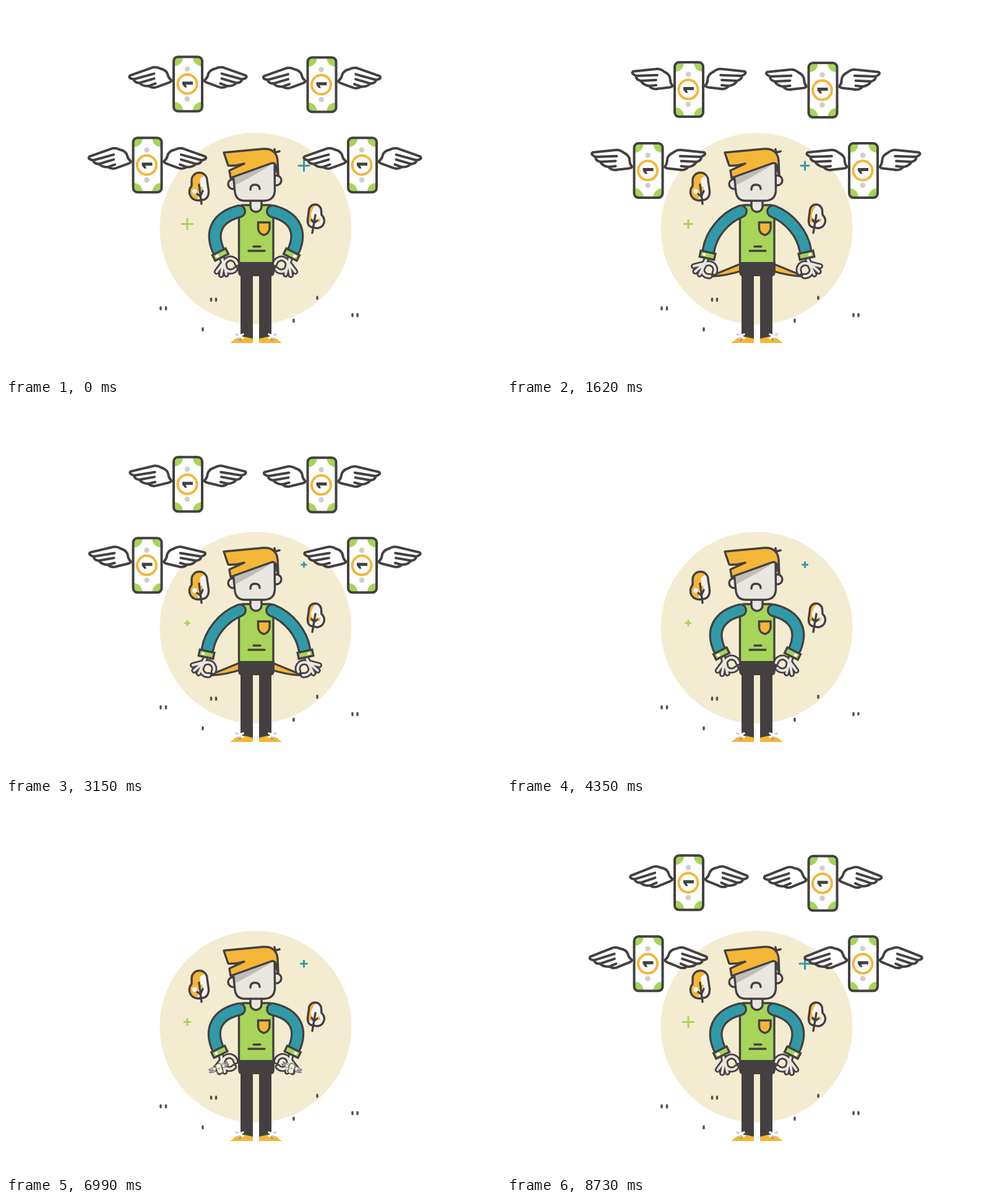
Animation of 800x600 px, one loop 8760 ms. Source, as an HTML page:

```html
<!DOCTYPE html>
<html lang="en">
<head>
<meta charset="utf-8">
<title>Empty pockets</title>
<style>
html, body { margin: 0; width: 100%; height: 100%; overflow: hidden; background: #fff; }
svg { display: block; width: 800px; height: 600px; }
.l { stroke: #444041; stroke-width: 3.4; stroke-linecap: round; stroke-linejoin: round; }
.bold { stroke-width: 4; }
.n { fill: none; }
.dark { fill: #444041; } .green { fill: #a6d55a; } .gold { fill: #f4b637; }
.skin { fill: #e9e6df; } .white { fill: #fff; } .grey { fill: #cdced4; }
.cap { fill: none; stroke-linecap: round; stroke-linejoin: round; }
</style>
</head>
<body>
<svg viewBox="0 0 800 600">
  <defs>
    <clipPath id="iris"><circle id="hole" cx="403" cy="362" r="999"/></clipPath>
    <clipPath id="note"><rect x="-23" y="-44" width="46" height="88" rx="7"/></clipPath>
    <clipPath id="leafA"><path id="treeA" d="M300 291V282A12.500 12.500 0 0 1 325 282L327.500 299Q328 314 314 314A14 14 0 0 1 300 291Z"/></clipPath>
    <clipPath id="leafB"><path id="treeB" d="M510 338L509.500 331A10 10 0 0 0 489.500 331L487.500 346Q487 358 497 358A12 12 0 0 0 510 338Z"/></clipPath>
    <g id="wing">
      <path class="l bold white" d="M-67-8L-33-20Q-26-23-18-19Q-8-17-6-9Q-5-4 0 0Q0 2-5 4L-22 10Q-30 14-37 9Q-46 10-52 4Q-60 4-61-2Q-71-4-67-8Z"/>
      <path class="l bold n" d="M-61-2L-28-11M-52 4L-28-3M-37 9L-26 5"/>
    </g>
    <g id="bill">
      <g id="flap"><use href="#wing"/></g>
      <g transform="scale(-1 1)"><use href="#flap"/></g>
      <rect class="white" x="-23" y="-44" width="46" height="88" rx="7"/>
      <g class="green" clip-path="url(#note)">
        <circle cx="-22" cy="-43" r="14"/><circle cx="22" cy="-43" r="14"/>
        <circle cx="-22" cy="43" r="14"/><circle cx="22" cy="43" r="14"/>
      </g>
      <rect class="l bold n" x="-23" y="-44" width="46" height="88" rx="7"/>
      <circle class="grey" cx="-1" cy="-24.500" r="4.300"/><circle class="grey" cx="-1" cy="24" r="4.300"/>
      <circle cx="-1" r="15.500" fill="#fff" stroke="#f4b637" stroke-width="4"/>
      <path class="dark" d="M8-4v5H-3.500l2 4.500h-3.500L-9 .5V-4z"/>
    </g>
    <g id="shoe">
      <path class="gold" d="M362 545Q368 541 374 535L386 535L399 538V545Z"/>
      <path class="cap" stroke="#8b8786" stroke-width="3" d="M373 535L378 540"/>
      <path class="cap" stroke="#cdced4" stroke-width="3.500" d="M372 531L377 533L376 538"/>
      <path class="cap" stroke="#fff" stroke-width="3.500" d="M372 536L383 531M377 533L383 537"/>
    </g>
    <path id="fingers" d="M0 5L-2 14M-2 14L-18 22M-2 14L-14 30M-1 14L-6 33M17 25.500A10.500 10.500 0 1 0 11 32.200"/>
    <g id="arm">
      <g id="hand">
        <use href="#fingers" class="cap" stroke="#444041" stroke-width="9.500"/>
        <use href="#fingers" class="cap" stroke="#e9e6df" stroke-width="4"/>
      </g>
      <path id="edge" class="cap" stroke="#444041" stroke-width="22"/>
      <path id="sleeve" class="cap" stroke="#319aa8" stroke-width="15.500"/>
      <g id="cuff">
        <rect class="l green" x="-12" y="-5" width="24" height="10" style="stroke-linejoin:miter"/>
        <circle class="white" cx="-5.500" r="2.500"/>
      </g>
    </g>
    <path id="lining" class="l gold"/>
  </defs>

  <g clip-path="url(#iris)">
    <circle cx="403.500" cy="360" r="155" fill="#f4ecd0"/>
    <path id="ground" class="cap" stroke="#575352" stroke-width="3.600"/>
    <path id="plusA" class="cap" stroke="#a6d55a" stroke-width="3"/>
    <path id="plusB" class="cap" stroke="#319aa8" stroke-width="3"/>

    <g clip-path="url(#leafA)">
      <rect class="gold" x="290" y="264" width="42" height="56"/>
      <path fill="#f5f2ec" d="M313 281Q318 272 330 276V320H309L311 299Q316 291 313 281Z"/>
      <circle cx="305" cy="300" r="4" fill="#f5f2ec"/><circle class="gold" cx="315" cy="295" r="3"/>
    </g>
    <use href="#treeA" class="l n"/>
    <path class="l n" d="M312 289L316 320M309 304L314 308L318 299"/>
    <g clip-path="url(#leafB)">
      <rect class="gold" x="480" y="316" width="38" height="48"/>
      <path fill="#f5f2ec" d="M495 331Q497 323 504 322H518V364H499L496 345Q490 340 495 331Z"/>
      <circle cx="493" cy="353" r="3.500" fill="#f5f2ec"/><circle class="gold" cx="505" cy="346.500" r="3"/>
    </g>
    <use href="#treeB" class="l n"/>
    <path class="l n" d="M500 338L495 367M494 346L498 351L503 347"/>

    <use href="#lining"/><use href="#lining" class="flip"/>
    <path class="l green" d="M376.500 416V328Q377 322 383 322H426Q432 322 432 328V416Z"/>
    <path class="dark" d="M375 414H434V428Q434 437 429 437V538H409V437H399V538H379V437Q375 436 375 428Z"/>
    <use href="#shoe"/><use href="#shoe" class="flip"/>
    <path class="l gold" style="stroke-linejoin:miter" d="M407.500 350H426V360Q425 368 417 370.500Q408 368 407.500 360Z"/>
    <path class="l n" d="M400 389H411M392 396H418"/>

    <path class="l skin" d="M395 312V324A9 9 0 0 0 413 324V312Z"/>
    <circle class="l skin" cx="367" cy="288" r="8"/><circle class="l skin" cx="437" cy="282" r="8"/>
    <path class="skin" d="M367 272L370 301Q372 315 386 315H418Q434 314 434.500 298L434 250Z"/>
    <path fill="#bfbdba" d="M368 274L432 252L425 259Q396 277 370 290Z"/>
    <path class="l n" d="M367 272L370 301Q372 315 386 315H418Q434 314 434.500 298L434 250"/>
    <path class="l gold" d="M352 237L416 231Q437 230 439 250L440 273Q437 268 436 258Q434 252 427 255L363 278L361 266L385 255Q370 259 359 258Z"/>
    <path class="l n" d="M434 231.500L435 238M435 237L442 235M395 297Q395 289 402 289Q410 289 410 296"/>
    <use href="#arm"/><use href="#arm" class="flip"/>
  </g>
  <g id="bills"></g>
</svg>
<script>
const LOOP = 8760, $ = id => document.getElementById(id);
const set = (el, name, value) => el.setAttribute(name, value);
const clamp = x => Math.min(1, Math.max(0, x));
const span = (t, a, b) => clamp((t - a) / (b - a));
const smooth = (t, a, b) => { const u = span(t, a, b); return u * u * (3 - 2 * u); };
const mix = (a, b, k) => a + (b - a) * k;

document.querySelectorAll('.flip').forEach(e => set(e, 'transform', 'translate(808) scale(-1 1)'));
set($('ground'), 'd', [[250, 489], [258.5, 489], [331.5, 475], [339.5, 475], [318, 523],
  [465, 509], [503, 472], [560, 500], [568, 500]].map(([x, y]) => `M${x} ${y - 1.6}v3.2`).join(''));

// sleeve curve (8 values), then cuff x, y and angle
const HIP = [377, 332, 342, 341, 330, 364, 342.5, 394, 346.5, 402, -27];
const OUT = [378, 332, 350, 343, 330, 370, 326, 394, 324, 403, 12];
const RAISED = [375, 329, 337, 325, 322, 340, 322, 374, 322, 383, -5];

// resting place, bend of the path, first tilt, side
const bills = [
  { x: 228.5, y: 262, cx: 319, cy: 293, tilt: -30, side: -1 },
  { x: 576, y: 262, cx: 488, cy: 293, tilt: 30, side: 1 },
  { x: 294, y: 131, cx: 319.5, cy: 280, tilt: -16, side: -1 },
  { x: 510.5, y: 132, cx: 486, cy: 280, tilt: 16, side: 1 }
];
for (const b of bills) {
  b.el = document.createElementNS('http://www.w3.org/2000/svg', 'use');
  set(b.el, 'href', '#bill');
  $('bills').append(b.el);
}

function drawArms(t) {
  const out = smooth(t, 60, 700) - smooth(t, 3180, 3620);
  const up = smooth(t, 6850, 7740) - smooth(t, 7740, 8500);
  const p = HIP.map((v, i) => v + (OUT[i] - v) * out + (RAISED[i] - v) * up);
  const d = `M${p[0]} ${p[1]}C${p.slice(2, 8)}`;
  set($('edge'), 'd', d);
  set($('sleeve'), 'd', d);
  for (const id of ['hand', 'cuff']) set($(id), 'transform', `translate(${p[8]} ${p[9]}) rotate(${p[10]})`);
  const x = mix(384, 331, out), y = mix(424, 437, out);
  set($('lining'), 'd', `M380 416L${x} ${y - 1}Q${x - 1} ${y + 1} ${x + 2} ${y}Q${mix(382, 355, out)} ${mix(427, 436, out)} 380 428Z`);
}

function drawBills(t, phase) {
  const angle = phase / 600 * 2 * Math.PI - Math.PI / 6;
  const beat = ((phase / 600 + .07) % 1 + 1) % 1;
  // slow lift of the wings, quick stroke down
  const lift = beat < .76 ? (beat / .76) ** .65 : 1 - smooth(beat, .76, 1);
  set($('flap'), 'transform', `translate(-26.5 -6) rotate(${lift * 17.5 - 4})`);
  const arriving = t > 6000;
  const away = arriving ? 0 : span(t, 3150, 4200) ** 1.4;
  const k = arriving ? smooth(t, 6900, 8720) : 1;
  const size = arriving ? Math.min(1, .93 * (k / .44) ** .4) : 1 - clamp(2 * away - 1);
  for (const b of bills) {
    const bend = (from, mid, to) => (1 - k) ** 2 * from + 2 * k * (1 - k) * mid + k * k * to;
    const x = bend(b.side < 0 ? 345 : 461, b.cx, b.x) + b.side * 24 * (1 - (1 - away) ** 4);
    const y = bend(430, b.cy, b.y) - 5.5 * Math.cos(angle) * k - 120 * away;
    set(b.el, 'visibility', size > .005 ? 'visible' : 'hidden');
    set(b.el, 'transform', `translate(${x} ${y}) rotate(${b.tilt * (1 - k)}) scale(${size})`);
  }
}

function drawPluses(phase) {
  const swell = Math.sqrt((1 + Math.cos(phase / 1260 * 2 * Math.PI)) / 2);
  const h = 3.5 + 5 * swell;
  const plus = (x, y) => `M${x - h} ${y}h${2 * h}M${x} ${y - h}v${2 * h}`;
  set($('plusA'), 'd', plus(293, 352.5));
  set($('plusB'), 'd', plus(481.5, 258.3));
}

function drawIris(t) {
  const shut = span(t, 4200, 4980), open = span(t, 5917, 6697);
  const r = t < 4200 ? 999 : t < 5500 ? 225 * (1 - shut * shut) : 225 * (1 - (1 - open) ** 2);
  set($('hole'), 'r', r);
}

function frame(now) {
  const t = now % LOOP, phase = t > 6000 ? t - LOOP : t;
  drawIris(t);
  drawArms(t);
  drawPluses(phase);
  drawBills(t, phase);
  requestAnimationFrame(frame);
}
frame(performance.now());
</script>
</body>
</html>
```
